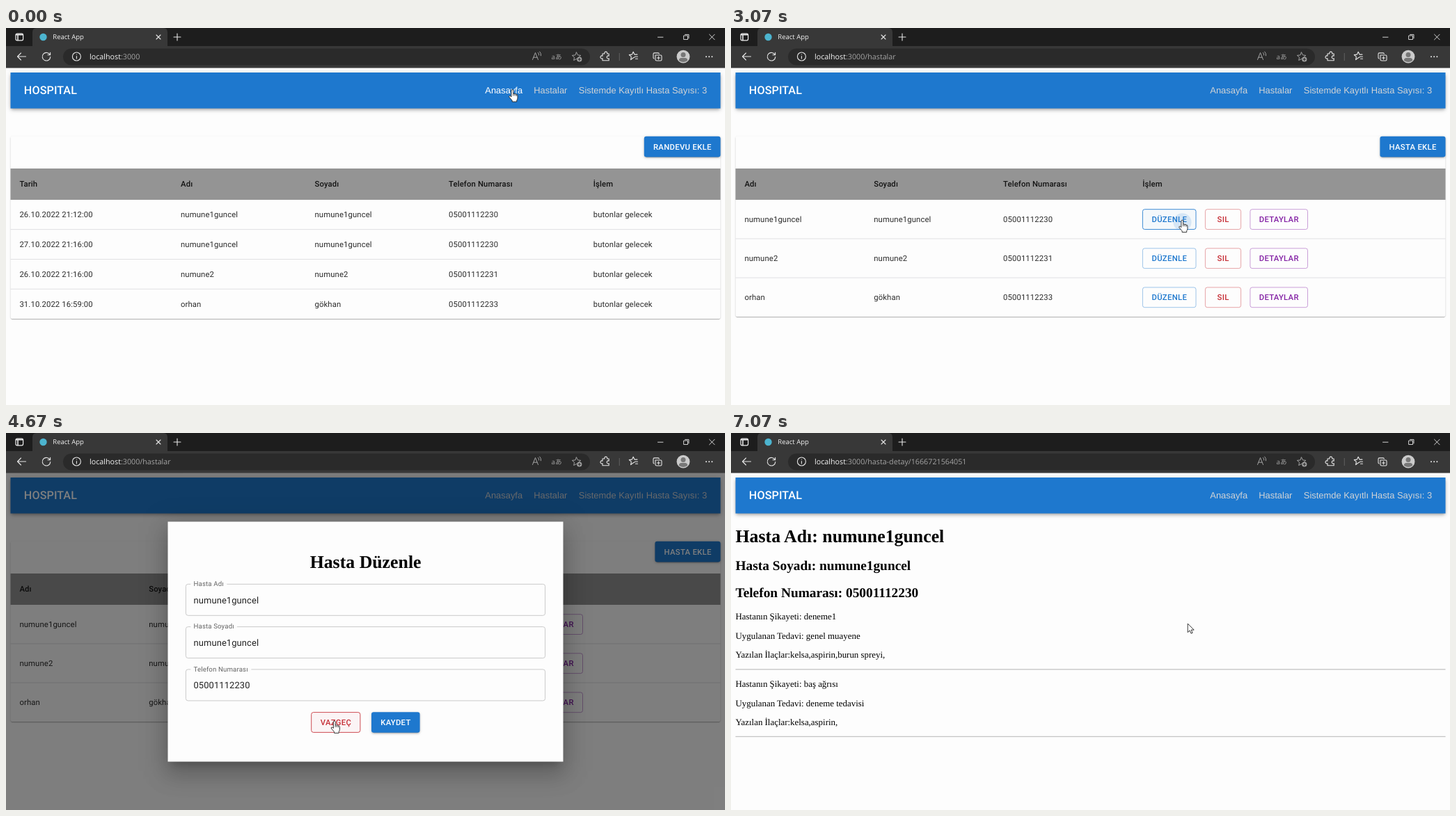
Animation of 1033x542 px, one loop 7140 ms. Source, as an HTML page:

```html
<!DOCTYPE html>
<html lang="tr">
<head>
<meta charset="utf-8">
<title>React App</title>
<style>
html, body { margin: 0; width: 100%; height: 100%; overflow: hidden; background: #fdfdfd; }
svg { display: block; width: 1033px; height: 542px; }
text { white-space: pre; text-rendering: geometricPrecision; }
.ui { font-family: "Open Sans", "Noto Sans", sans-serif; }
.cell { font: 400 11.3px Roboto, sans-serif; letter-spacing: .12px; fill: #2c2c2c; }
.head { font-weight: 500; fill: #141414; }
.btn { font: 500 11.3px Roboto, sans-serif; letter-spacing: .32px; text-anchor: middle; }
.link { font: 12.91px "Liberation Sans", Arial, sans-serif; }
.field { font: 400 12.91px Roboto, sans-serif; letter-spacing: .12px; }
.serif { font-family: "Liberation Serif", "Times New Roman", serif; }
.icon { fill: none; stroke: #e6e6e6; stroke-width: 1.1; stroke-linecap: round; stroke-linejoin: round; }
.dim { stroke: #a2a2a2; stroke-width: 1; }
</style>
</head>
<body>
<svg id="stage" viewBox="0 0 1033 542"></svg>
<script>
const LOOP = 7140;
const BLUE = '#1e78ce', RED = '#c62e36', PURPLE = '#8423a5', PAPER = '#fdfdfd';
const TIMES = { list: 1100, open: 3100, label: 3146, notch: 3200, close: 4790, detail: 6270 };
const SCALE = .807;

const PATIENTS = [
  ['numune1guncel', 'numune1guncel', '05001112230'],
  ['numune2', 'numune2', '05001112231'],
  ['orhan', 'gökhan', '05001112233']
];
const VISITS = [
  ['26.10.2022 21:12:00', 0], ['27.10.2022 21:16:00', 0],
  ['26.10.2022 21:16:00', 1], ['31.10.2022 16:59:00', 2]
];

// time, x, y of the pointer tip
const MOVES = [
  [0, 727.6, 88.6], [300, 727.6, 88.6], [800, 790.3, 91.4], [1650, 790.3, 91.4],
  [2600, 648.5, 276.2], [3100, 648.5, 276.2], [3180, 644, 277],
  [3930, 644, 277], [4500, 472, 414], [5180, 472, 414],
  [5800, 780, 276], [6350, 780, 276], [6850, 656.2, 274], [LOOP, 656.2, 274]
];
// press times and the button labels they hit
const PRESSES = [[2940, 'DÜZENLE'], [4680, 'VAZGEÇ'], [6150, 'DETAYLAR']];

const zones = [];
const $ = id => document.getElementById(id);
const clamp = v => Math.max(0, Math.min(1, v));
const mix = (a, b, k) => a + (b - a) * k;

const rect = (x, y, w, h, fill, more = '') =>
  `<rect x="${x}" y="${y}" width="${w}" height="${h}" fill="${fill}" ${more}/>`;
const text = (x, y, s, cls, more = '') => `<text x="${x}" y="${y}" class="${cls}" ${more}>${s}</text>`;
const icon = (d, cls = '', more = '') => `<path d="${d}" class="icon ${cls}" ${more}/>`;
const group = (id, body, more = '') => `<g id="${id}" ${more}>${body}</g>`;

// layers: [dy, blur, spread, alpha] in CSS pixels
function shadow(x, y, w, h, layers) {
  return layers.map(([dy, blur, grow, a]) => {
    const g = grow * SCALE;
    return rect(x - g, y - g + dy * SCALE, w + 2 * g, h + 2 * g, '#000',
      `rx="3" fill-opacity="${a}" style="filter:blur(${blur * SCALE / 2}px)"`);
  }).join('');
}
const LOW = [[2, 1, -1, .2], [1, 1, 0, .14], [1, 3, 0, .12]];
const MID = [[3, 1, -2, .2], [2, 2, 0, .14], [1, 5, 0, .12]];
const BAR = [[2, 4, -1, .2], [4, 5, 0, .14], [1, 10, 0, .12]];
const HIGH = [[11, 15, -7, .2], [24, 38, 3, .14], [9, 46, 8, .12]];

function button(page, label, x, y, w, color, filled) {
  const id = 'b' + zones.length, h = 29.6;
  zones.push({ page, label, id, x, y, w, h, color, filled });
  const box = filled
    ? shadow(x, y, w, h, MID) + rect(x, y, w, h, color, `id="${id}" rx="3.2"`)
    : rect(x + .4, y + .4, w - .8, h - .8, color,
      `id="${id}" rx="3" fill-opacity="0" stroke="${color}" stroke-opacity=".5" stroke-width=".85"`);
  return box + text(x + w / 2 + .15, y + 18.8, label, 'btn', `fill="${filled ? '#fff' : color}"`);
}

function link(label, x, w) {
  const id = 'b' + zones.length;
  zones.push({ page: 'any', label, id, x, y: 82, w, h: 17, link: true });
  return text(x, 94.2, label, 'link', `id="${id}" fill="#d0d3d6"`);
}

function chrome() {
  const star = 'l1.9 3.9 4.3.5-3.2 2.9.9 4.2-3.9-2.1-3.9 2.1.9-4.2-3.2-2.9 4.3-.5z';
  return rect(0, 0, 1033, 27, '#1d1d1d') + rect(0, 26, 1033, 31.5, '#383838') +
    '<path d="M38 27V6q0-6 6-6h182q6 0 6 6v21z" fill="#383838"/>' +
    rect(82, 29.5, 757, 24, '#2a2a2a', 'rx="12"') +
    rect(14, 8.2, 10.6, 9.6, 'none', 'rx="2" stroke="#eee" stroke-width="1.2"') +
    icon('M14.5 9.6h9.6M17 10v7.5', '', 'style="stroke-width:1.6"') +
    '<circle cx="53.5" cy="13" r="5.2" fill="#4cb4cf"/>' +
    text(67.3, 16.4, 'React App', 'ui', 'font-size="9.5" fill="#f2f2f2"') +
    icon('M216 10l6 6M222 10l-6 6M241 13h10M246 8v10') +
    icon('M936.5 13.2h7.5M974 11h5.5v5.5h-5.5zM975.6 9.4h5.4v5.4M1010.5 9.2l7.6 7.6M1018.1 9.2l-7.6 7.6', '', 'style="stroke-width:.9"') +
    icon('M28.5 41H16.5M21.5 36l-5 5 5 5') +
    icon('M63.2 38.6a5.8 5.8 0 1 0 .6 3M63.6 35.2v3.6h-3.6') +
    icon('M107.4 41a6 6 0 1 1-12 0a6 6 0 1 1 12 0M101.4 40.5v3.4M101.4 38v.1') +
    '<text x="120" y="45" class="ui" font-size="10.73" fill="#f4f4f4">localhost<tspan id="path" fill="#a4a4a4"></tspan></text>' +
    icon('M756.5 45.5l4-10 4 10M758 42.2h5M764.5 35.5q1.6 1.4 1.2 3.6M766.7 34q2.5 2.2 1.9 5.8', 'dim') +
    text(783.6, 44.8, 'aあ', 'ui', 'font-size="9.6" fill="#a2a2a2" style="font-family:\'Open Sans\',\'Noto Sans CJK JP\',sans-serif"') +
    icon('M819.6 35' + star, 'dim') +
    '<circle cx="823.8" cy="45" r="3.6" fill="#a2a2a2"/>' + icon('M822 45h3.6M823.8 43.2v3.6', '', 'style="stroke:#2a2a2a"') +
    icon('M857 37h3a2 2 0 1 1 3.6 0h2.6v3.2a2 2 0 1 0 0 3.4v3.2h-9.2v-3.2a2 2 0 1 1 0-3.4z') +
    rect(880.8, 36, .9, 11, '#666') +
    icon('M903 42l-2 1-3.4 2.6.8-4.2-3.1-2.8 4.1-.5 1.8-3.8 1.8 3.8h4M903.5 41.2h4M904.5 44.3h3') +
    icon('M933 39h7.5q1.5 0 1.5 1.5v5q0 1.5-1.5 1.5H935q-2 0-2-1.5zM931 44q-1-.5-1-1.5v-5q0-1.6 1.6-1.6h5q1.3 0 1.8 1M937.5 41v4M935.5 43h4') +
    '<circle cx="973" cy="41.2" r="9.4" fill="#cbcbcb"/><circle cx="973" cy="38.4" r="3.5" fill="#777"/><path d="M966.8 46.8q0-3.8 3.6-3.8h5.2q3.6 0 3.6 3.8q-6.2 4.4-12.4 0z" fill="#777"/>' +
    [1006, 1010.2, 1014.4].map(x => `<circle cx="${x}" cy="41.3" r="1" fill="#eee"/>`).join('');
}

function navbar() {
  return shadow(6.5, 64, 1020, 51.6, BAR) + rect(6.5, 64, 1020, 51.6, BLUE) +
    text(25.8, 95.3, 'HOSPITAL', '', 'fill="#fff" style="font:500 16.14px Roboto,sans-serif;letter-spacing:.12px"') +
    link('Anasayfa', 688.3, 54) + link('Hastalar', 758.3, 48.5) +
    text(822.8, 94.2, 'Sistemde Kayıtlı Hasta Sayısı: 3', 'link', 'fill="#d0d3d6"');
}

function table(cols, titles, rows, rowH) {
  const bottom = 247 + rows.length * rowH;
  let s = shadow(6.5, 155.5, 1020, bottom - 155.5, LOW) +
    rect(6.5, 155.5, 1020, bottom - 155.5, PAPER, 'rx="3.2"') + rect(6.5, 202, 1020, 45, '#949494');
  titles.forEach((h, i) => s += text(cols[i], 228.2, h, 'cell head'));
  rows.forEach((row, r) => {
    const y = 247 + r * rowH;
    row.forEach((v, i) => s += text(cols[i], y + rowH / 2 + 3.9, v, 'cell'));
    if (r < rows.length - 1) s += rect(6.5, y + rowH - .6, 1020, .9, '#dddde0');
  });
  return s;
}

function homePage() {
  const rows = VISITS.map(([when, p]) => [when, ...PATIENTS[p], 'butonlar gelecek']);
  return table([19.4, 251, 443.5, 636, 843.7], ['Tarih', 'Adı', 'Soyadı', 'Telefon Numarası', 'İşlem'], rows, 42.8) +
    button('home', 'RANDEVU EKLE', 916.8, 155.8, 109.7, BLUE, true);
}

function listPage() {
  let s = table([19.4, 205.2, 391, 591.3], ['Adı', 'Soyadı', 'Telefon Numarası', 'İşlem'], PATIENTS, 56.1) +
    button('list', 'HASTA EKLE', 932.4, 155.8, 94.1, BLUE, true);
  PATIENTS.forEach((p, i) => {
    const y = 260.3 + i * 56.1;
    s += button('list', 'DÜZENLE', 591, y, 77.4, BLUE) + button('list', 'SIL', 681, y, 52, RED) +
      button('list', 'DETAYLAR', 745.5, y, 83.4, PURPLE);
  });
  return s;
}

function detailPage() {
  const line = (y, s, size = 12.91, weight = 400) =>
    text(6.5, y, s, 'serif', `font-size="${size}" font-weight="${weight}" fill="#000"`);
  const [name, last, phone] = PATIENTS[0];
  const visit = (y, a, b, c) => line(y, 'Hastanın Şikayeti: ' + a) + line(y + 27.5, 'Uygulanan Tedavi: ' + b) +
    line(y + 55, 'Yazılan İlaçlar:' + c) + rect(6.5, y + 70.8, 1020, 1.3, '#c4c4c4');
  return line(157, 'Hasta Adı: ' + name, 25.82, 700) + line(197.4, 'Hasta Soyadı: ' + last, 19.37, 700) +
    line(236.3, 'Telefon Numarası: ' + phone, 19.37, 700) +
    visit(268.4, 'deneme1', 'genel muayene', 'kelsa,aspirin,burun spreyi,') +
    visit(365, 'baş ağrısı', 'deneme tedavisi', 'kelsa,aspirin,');
}

const FIELDS = [['Hasta Adı', 52], ['Hasta Soyadı', 66.5], ['Telefon Numarası', 87]];

function modal() {
  let s = shadow(232.5, 127.5, 568, 345, HIGH) + rect(232.5, 127.5, 568, 345, PAPER) +
    text(516.6, 194.2, 'Hasta Düzenle', 'serif', 'font-size="25.82" font-weight="700" text-anchor="middle"');
  FIELDS.forEach(([label], i) => {
    const y = 217.3 + i * 61.3;
    s += rect(258.4, y, 516.2, 45, 'none', 'rx="3.2" stroke="#c5c5c5" stroke-width=".9"') +
      rect(265.3, y - 1, 0, 2, PAPER, `id="notch${i}"`) +
      text(269.5, y + 27.3, PATIENTS[0][i], 'field value', 'fill="#222"') +
      text(269.5, 0, label, 'field', `id="label${i}" fill="#666"`);
  });
  return s + button('modal', 'VAZGEÇ', 438.3, 401.2, 71, RED) + button('modal', 'KAYDET', 525, 401.2, 69.6, BLUE, true);
}

const pointers =
  group('arrow', '<path d="M0 0V12.6L2.9 9.9 4.8 14.2 6.9 13.3 5 9.1H9z" fill="#fff" stroke="#222" stroke-width=".9" stroke-linejoin="round"/>') +
  group('hand', '<path d="M-1.6 1.4Q-1.6 0 -.2 0T1.2 1.4V6Q2.4 5.2 3.4 6.4 4.8 5.6 5.6 7 7.4 6.6 7.4 8.6V12.2Q7.4 14 6.2 15.4V17.4H-.4V15.6L-4.4 11Q-5.2 9.6 -4.2 9 -3 8.6 -1.6 10.4z" fill="#fff" stroke="#222" stroke-width=".9" stroke-linejoin="round"/><path d="M1.2 6V9M3.4 6.6V9M5.6 7.2V9.4" stroke="#222" stroke-width=".8" fill="none"/>');

$('stage').innerHTML = '<defs><clipPath id="clip"><rect id="clipBox" rx="3.2"/></clipPath></defs>' +
  rect(0, 0, 1033, 542, PAPER) +
  group('home', homePage()) + group('list', listPage()) + group('detail', detailPage()) + navbar() +
  rect(0, 57, 1033, 485, '#000', 'id="shade"') + group('modal', modal()) +
  '<g clip-path="url(#clip)"><circle id="ripple"/></g>' + chrome() + pointers;

const PATHS = { home: ':3000', list: ':3000/hastalar', detail: ':3000/hasta-detay/1666721564051' };
const show = (el, on) => el.setAttribute('display', on ? 'inline' : 'none');
const set = (el, o) => { for (const k in o) el.setAttribute(k, o[k]); };

// cubic-bezier(x1, 0, .2, 1)
function ease(x1, t) {
  t = clamp(t);
  let lo = 0, hi = 1, u = .5;
  for (let i = 0; i < 24; i++) {
    u = (lo + hi) / 2;
    const v = 1 - u, x = 3 * u * v * v * x1 + .6 * u * u * v + u * u * u;
    if (x < t) lo = u; else hi = u;
  }
  return u * u * (3 - 2 * u);
}

function pointerAt(t) {
  let i = 0;
  while (i < MOVES.length - 2 && MOVES[i + 1][0] <= t) i++;
  const [t0, x0, y0] = MOVES[i], [t1, x1, y1] = MOVES[i + 1];
  const k = clamp((t - t0) / (t1 - t0)), e = k * k * (3 - 2 * k);
  return [mix(x0, x1, e), mix(y0, y1, e)];
}

function drawModal(t) {
  set($('shade'), { 'fill-opacity': .5 * ease(.4, (t - TIMES.open) / 225) });
  const k = ease(0, (t - TIMES.label) / 200), n = clamp((t - TIMES.notch) / 100);
  FIELDS.forEach(([, w], i) => {
    const label = $('label' + i);
    label.setAttribute('y', 217.3 + i * 61.3 + mix(27.3, 2.7, k));
    label.style.fontSize = mix(12.91, 9.68, k) + 'px';
    set($('notch' + i), { width: w * n });
  });
  document.querySelectorAll('.value').forEach(v => show(v, t >= TIMES.label));
}

function drawRipple(t, layer, x, y) {
  const press = PRESSES.find(([p]) => t >= p && t < p + 550);
  const b = press && zones.find(z => z.label === press[1] && z.page === layer);
  show($('ripple'), b);
  if (!b) return;
  const k = ease(.4, (t - press[0]) / 550);
  set($('clipBox'), { x: b.x, y: b.y, width: b.w, height: b.h });
  set($('ripple'), { cx: x, cy: y + 3, r: 62 * k, fill: b.color, 'fill-opacity': mix(.1, .3, k) });
}

function render(t) {
  const page = t < TIMES.list ? 'home' : t < TIMES.detail ? 'list' : 'detail';
  const open = t >= TIMES.open && t < TIMES.close;
  const layer = open ? 'modal' : page;
  for (const p in PATHS) show($(p), p === page);
  $('path').textContent = PATHS[page];
  show($('shade'), open);
  show($('modal'), open);
  if (open) drawModal(t);

  const [x, y] = pointerAt(t);
  let hot = false;
  for (const z of zones) {
    const on = (z.page === layer || (z.page === 'any' && !open)) &&
      x >= z.x && x <= z.x + z.w && y >= z.y && y <= z.y + z.h;
    hot = hot || on;
    const el = $(z.id);
    if (z.link) set(el, { fill: on ? '#fff' : '#d0d3d6' });
    else if (z.filled) set(el, { fill: on ? '#1565c0' : z.color });
    else set(el, { 'fill-opacity': on ? .04 : 0, 'stroke-opacity': on ? 1 : .5 });
  }
  drawRipple(t, layer, x, y);
  for (const id of ['hand', 'arrow']) {
    show($(id), (id === 'hand') === hot);
    set($(id), { transform: `translate(${x} ${y})` });
  }
}

function tick(now) {
  render(now % LOOP);
  requestAnimationFrame(tick);
}
render(0);
requestAnimationFrame(tick);
</script>
</body>
</html>
```
